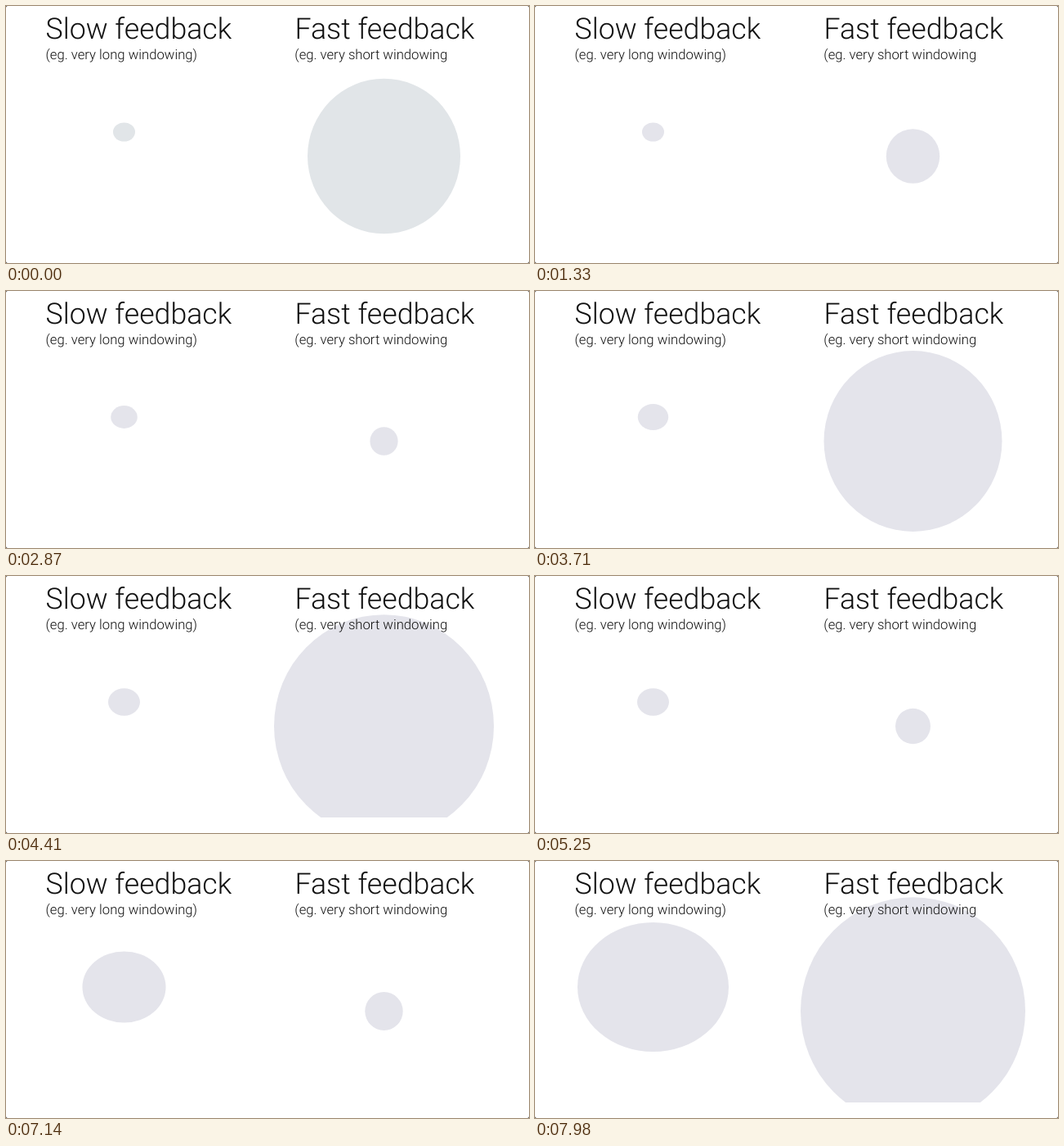
Recreate the animation shown at these times as an HTML page. Size 640 by 314 pixels, loop 8 s.

```html
<!DOCTYPE html>
<html lang="en">
<head>
<meta charset="utf-8">
<title>Slow and fast feedback</title>
<style>
  html, body { margin: 0; width: 100%; height: 100%; overflow: hidden; background: #222; }
  svg { display: block; width: 640px; height: 314px; background: #fff; border-radius: 2px; }
  text { font-family: Roboto, sans-serif; font-weight: 300; fill: #111; text-rendering: geometricPrecision; }
  .title { font-size: 35.7px; }
  .note { font-size: 16.7px; }
</style>
</head>
<body>
<svg viewBox="0 0 640 314">
  <clipPath id="stage"><rect width="640" height="295"/></clipPath>
  <g id="blobs" clip-path="url(#stage)">
    <ellipse id="slow" cx="144.5" cy="154"/>
    <ellipse id="fast" cx="462.5" cy="183.5"/>
  </g>
  <text class="title" x="48.5" y="40">Slow feedback</text>
  <text class="note" x="48.5" y="65">(eg. very long windowing)</text>
  <text class="title" x="353.5" y="40">Fast feedback</text>
  <text class="note" x="353.3" y="65">(eg. very short windowing</text>
</svg>
<script>
const LOOP = 8000, STEP = 70;
const QUIET = 17, DECAY = 1.7;

// Beats the fast circle reacts to: [step, peak radius]
const beats = [
  [0, 93.5], [4, 137.5], [16, 109], [29, 134.5], [45, 137.5], [53, 109], [63, 134.5],
  [71, 64], [79, 137.5], [85, 81], [90, 109], [97, 134.5], [114, 137.5]
];

const byId = id => document.getElementById(id);
const slow = byId('slow'), fast = byId('fast'), blobs = byId('blobs');

function ease(from, to, step) {
  const u = Math.min(1, Math.max(0, (step - from) / (to - from)));
  return u * u * (3 - 2 * u);
}

// A slight drift, then one late swell
const slowRadius = step => 13.5 + 6 * ease(22, 62, step) + 73 * ease(92, 114, step);

// Jumps to each beat's peak and falls back exponentially
function fastRadius(step) {
  const ring = ([at, peak]) =>
    step < at ? 0 : (peak - QUIET) * Math.exp((at - step) / DECAY);
  return QUIET + Math.max(...beats.map(ring));
}

function resize(ellipse, radius, aspect) {
  ellipse.setAttribute('rx', radius);
  ellipse.setAttribute('ry', radius * aspect);
}

const start = performance.now();

function draw() {
  const step = Math.floor((performance.now() - start) % LOOP / STEP);
  resize(slow, slowRadius(step), 0.854);
  resize(fast, fastRadius(step), 1.013);
  blobs.setAttribute('fill', step < 13 ? '#e1e5e8' : '#e4e4eb');
  requestAnimationFrame(draw);
}
draw();
</script>
</body>
</html>
```
